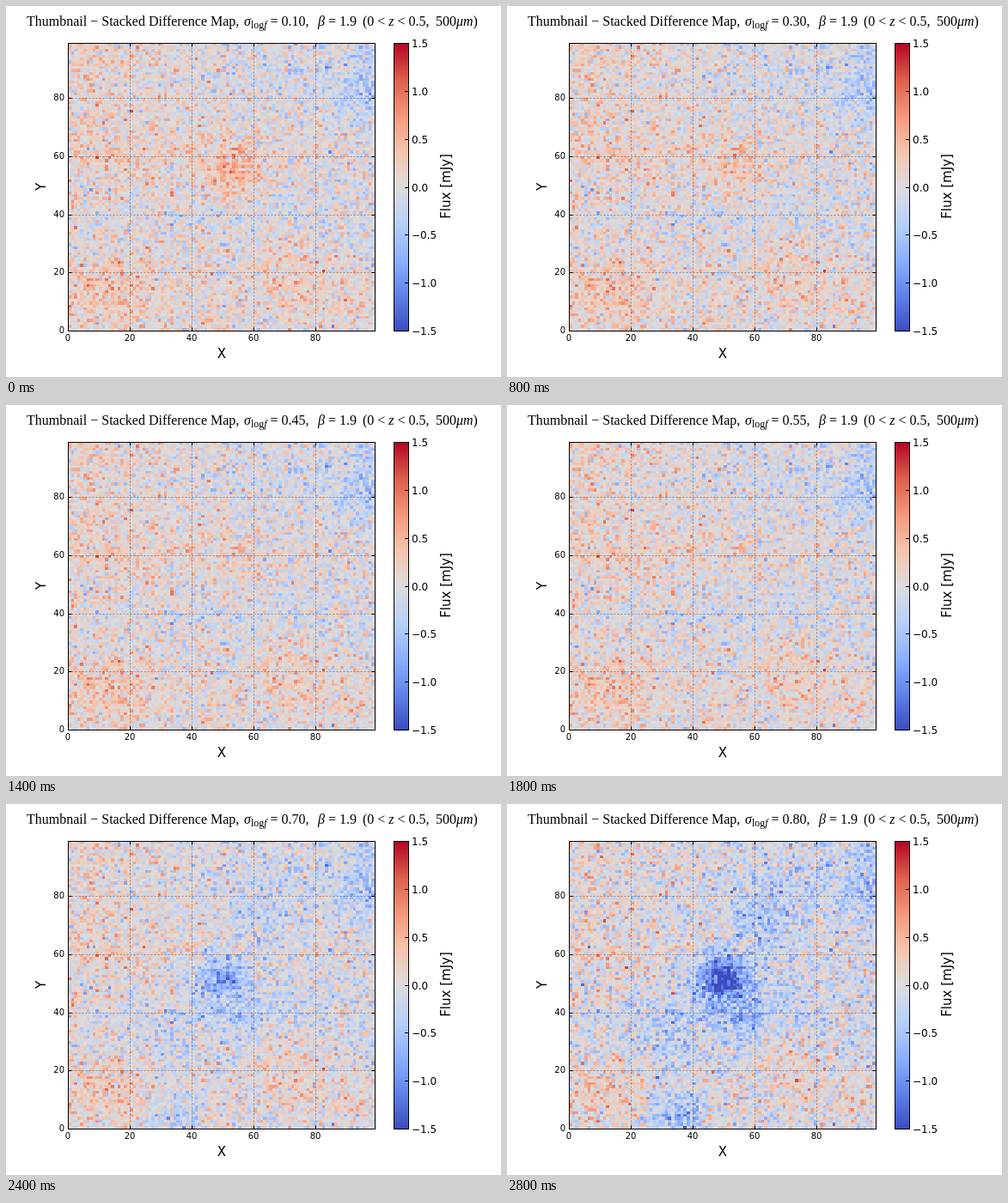
These frames come from a looping animation (576 by 432 pixels, 3 s). An HTML page with a canvas:

```html
<!DOCTYPE html>
<html lang="en">
<head>
<meta charset="utf-8">
<title>Stacked Difference Map</title>
<style>
  html, body { margin: 0; width: 100%; height: 100%; overflow: hidden; background: #fff; }
  canvas { display: block; }
</style>
</head>
<body>
<canvas id="stage" width="576" height="432"></canvas>
<script>
const ctx = document.getElementById("stage").getContext("2d");
const STEPS = 15, STEP_MS = 200, CELLS = 99, LIMIT = 1.5;
const plot = { x: 72, y: 43, w: 357, h: 335 };
const bar = { x: 451, y: 43, w: 17, h: 335 };
const SANS = '"DejaVu Sans", sans-serif';
const SERIF = '"Liberation Serif", serif';

const palette = ["3b4cc0", "6282ea", "8db0fe", "b8d0f9", "dddcdc",
                 "f5c4ad", "f4987a", "dd5f4b", "b40426"]
  .map(hex => [0, 2, 4].map(i => parseInt(hex.slice(i, i + 2), 16)));

function colorOf(value) {
  const t = Math.min(1, Math.max(0, (value / LIMIT + 1) / 2)) * (palette.length - 1);
  const i = Math.min(palette.length - 2, Math.floor(t));
  return palette[i].map((c, k) => Math.round(c + (palette[i + 1][k] - c) * (t - i)));
}

function randomSource(seed) {
  return () => {
    seed = seed + 0x6d2b79f5 | 0;
    let t = Math.imul(seed ^ seed >>> 15, 1 | seed);
    t = t + Math.imul(t ^ t >>> 7, 61 | t) ^ t;
    return ((t ^ t >>> 14) >>> 0) / 4294967296;
  };
}

function gaussianNoise(seed) {
  const random = randomSource(seed);
  return Array.from({ length: CELLS * CELLS }, () =>
    Math.sqrt(-2 * Math.log(1 - random())) * Math.cos(2 * Math.PI * random()));
}

const grain = gaussianNoise(7);

function blob(x, y, cx, cy, radius) {
  return Math.exp(-((x - cx) ** 2 + (y - cy) ** 2) / (2 * radius * radius));
}

// Broad slope and bands with a few steady patches
function steadyFlux(x, y) {
  const u = x / CELLS, v = y / CELLS;
  return .04 + .18 * (1 - 2 * u) * v + .07 * Math.cos(4 * Math.PI * (v - .13))
    + .25 * blob(x, y, 13, 13, 8)
    + .2 * blob(x, y, 72, 20, 8)
    - .3 * blob(x, y, 95, 83, 6);
}

// Deficit that opens up in the last steps
function deficit(x, y) {
  return .08
    + 1.35 * blob(x, y, 49, 51, 5)
    + .25 * blob(x, y, 51, 50, 14)
    + .35 * blob(x, y, 56, 38, 5)
    + .35 * blob(x, y, 63, 72, 8)
    + .6 * blob(x, y, 34, 3, 7)
    + .25 * blob(x, y, 30, 30, 9);
}

function makeMap(step) {
  const growth = [.2, .55, .35, 1][step - 11] ?? .01 * step;
  const peak = .55 * Math.max(0, 1 - step / 12);
  const fresh = gaussianNoise(100 + step);
  const map = document.createElement("canvas");
  map.width = map.height = CELLS;
  const mapCtx = map.getContext("2d");
  const image = mapCtx.createImageData(CELLS, CELLS);
  for (let y = 0; y < CELLS; y++) {
    for (let x = 0; x < CELLS; x++) {
      const i = y * CELLS + x;
      const value = steadyFlux(x, y) + peak * blob(x, y, 53, 54, 5.5)
        - growth * deficit(x, y)
        + .3 * grain[i] + (.04 + .12 * growth) * fresh[i];
      image.data.set([...colorOf(value), 255], ((CELLS - 1 - y) * CELLS + x) * 4);
    }
  }
  mapCtx.putImageData(image, 0, 0);
  return map;
}

const maps = Array.from({ length: STEPS }, (_, step) => makeMap(step));

function text(string, x, y, font, align = "left") {
  ctx.font = font;
  ctx.textAlign = align;
  ctx.fillText(string, x, y);
}

function verticalText(string, x, y) {
  ctx.save();
  ctx.translate(x, y);
  ctx.rotate(-Math.PI / 2);
  text(string, 0, 0, `15px ${SANS}`, "center");
  ctx.restore();
}

function line(x1, y1, x2, y2) {
  ctx.beginPath();
  ctx.moveTo(x1, y1);
  ctx.lineTo(x2, y2);
  ctx.stroke();
}

function frame({ x, y, w, h }) {
  ctx.strokeRect(x + .5, y + .5, w, h);
}

const roman = string => ({ string, font: `16px ${SERIF}`, drop: 0 });
const italic = string => ({ string, font: `italic 16px ${SERIF}`, drop: 0 });
const sub = (string, style = "") => ({ string, font: `${style} 12px ${SERIF}`, drop: 3 });
const relation = sign => roman(`\u2005${sign}\u2005`);

function flow(x, ...runs) {
  for (const { string, font, drop } of runs) {
    text(string, x, 23 + drop, font);
    x += ctx.measureText(string).width;
  }
}

function drawTitle(step) {
  const sigma = (.1 + .05 * step).toFixed(2);
  flow(24, roman("Thumbnail"), relation("−"), roman("Stacked Difference Map,"));
  flow(277, italic("σ"), sub("log"), sub("f", "italic"), relation("="), roman(sigma + ","));
  flow(363, italic("β"), relation("="), roman("1.9"));
  flow(415, roman("(0"), relation("<"), italic("z"), relation("<"), roman("0.5,"));
  flow(500, roman("500"), italic("μm"), roman(")"));
}

function drawAxes() {
  const right = plot.x + plot.w + .5, bottom = plot.y + plot.h + .5;
  const left = plot.x + .5, top = plot.y + .5;
  for (let value = 0; value <= 80; value += 20) {
    const x = Math.round(plot.x + value / CELLS * plot.w) + .5;
    const y = Math.round(plot.y + plot.h - value / CELLS * plot.h) + .5;
    ctx.strokeStyle = "rgba(0,0,0,.33)";
    ctx.setLineDash([2, 2]);
    if (value) {
      line(x, bottom, x, top);
      line(left, y, right, y);
    }
    ctx.strokeStyle = "#000";
    ctx.setLineDash([]);
    line(x, bottom, x, bottom - 4);
    line(x, top, x, top + 4);
    line(left, y, left + 4, y);
    line(right, y, right - 4, y);
    text(value, x - .5, 390, `10px ${SANS}`, "center");
    text(value, 68, y + 2.5, `10px ${SANS}`, "right");
  }
  frame(plot);
  text("X", 251, 409.5, `15px ${SANS}`, "center");
  verticalText("Y", 45.5, 210.5);
}

function drawColorBar() {
  for (let row = 0; row < bar.h; row++) {
    ctx.fillStyle = `rgb(${colorOf(LIMIT * (1 - 2 * row / bar.h))})`;
    ctx.fillRect(bar.x, bar.y + row, bar.w, 1);
  }
  ctx.fillStyle = "#000";
  for (let value = -1.5; value <= 1.5; value += .5) {
    const y = Math.round(bar.y + (1 - value / LIMIT) / 2 * bar.h) + .5;
    line(bar.x + bar.w, y, bar.x + bar.w - 4, y);
    text(value.toFixed(1).replace("-", "−"), 472, y + 4, `12px ${SANS}`);
  }
  frame(bar);
  verticalText("Flux [mJy]", 517, 210);
}

function draw(step) {
  ctx.fillStyle = "#fff";
  ctx.fillRect(0, 0, 576, 432);
  ctx.imageSmoothingEnabled = false;
  ctx.drawImage(maps[step], plot.x, plot.y, plot.w, plot.h);
  ctx.fillStyle = "#000";
  ctx.lineWidth = 1;
  drawTitle(step);
  drawAxes();
  drawColorBar();
}

let start, shown = -1;
function tick(now) {
  start ??= now;
  const step = Math.floor((now - start) / STEP_MS) % STEPS;
  if (step !== shown) draw(shown = step);
  requestAnimationFrame(tick);
}
draw(shown = 0);
requestAnimationFrame(tick);
</script>
</body>
</html>
```
